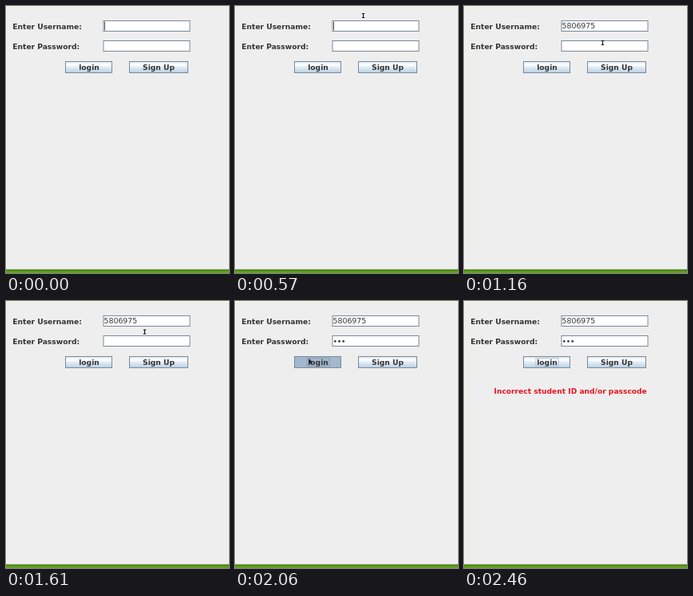
An HTML page for the animation above (2530 ms loop, 279 by 334 pixels).

```html
<!DOCTYPE html>
<html lang="en">
<head>
<meta charset="utf-8">
<title>Login form</title>
<style>
  html, body { margin: 0; width: 100%; height: 100%; overflow: hidden; background: #eee; }
  svg { display: block; width: 279px; height: 334px; }
  text { font: bold 9.15px "DejaVu Sans", sans-serif; fill: #333; white-space: pre; }
  .typed { font-weight: normal; font-size: 9.4px; }
  .middle { text-anchor: middle; }
  .field { fill: #fff; stroke: #7a8a99; }
  .button { fill: url(#metal); stroke: #7a8a99; }
  .button.pressed { fill: #a3b8cc; }
  .focus { fill: none; stroke: #a3b8cc; stroke-width: .8; }
  .pressed ~ .focus { stroke: #7f98b2; }
  #error { fill: #e8141e; }
</style>
</head>
<body>
<svg viewBox="0 0 279 334">
  <defs>
    <linearGradient id="metal" x2="0" y2="1">
      <stop offset="0" stop-color="#dde8f3"/>
      <stop offset=".3" stop-color="#fff"/>
      <stop offset=".5" stop-color="#e4edf6"/>
      <stop offset="1" stop-color="#b8cfe5"/>
    </linearGradient>
    <linearGradient id="grass" x2="0" y2="1">
      <stop offset="0" stop-color="#3f6a10"/>
      <stop offset=".5" stop-color="#5b9a16"/>
      <stop offset="1" stop-color="#6aa822"/>
    </linearGradient>
  </defs>

  <rect width="279" height="334" fill="#eee"/>
  <rect width="279" height="1" fill="#f8fbd4"/>
  <rect width="1" height="329" fill="#f3f7e6"/>
  <rect y="329.5" width="279" height="4.5" fill="url(#grass)"/>

  <text x="8.3" y="28.5">Enter Username:</text>
  <text x="8.3" y="54">Enter Password:</text>
  <rect class="field" x="122" y="18.5" width="108" height="13"/>
  <rect class="field" x="122" y="43.5" width="108" height="13"/>
  <text id="user" class="typed" x="122.5" y="28.2"></text>
  <g id="dots" fill="#333"></g>
  <path id="caret" d="M123.5 19.5v11" stroke="#555"/>

  <g>
    <rect id="login" class="button" x="74.5" y="69.5" width="58" height="14"/>
    <rect id="focus" class="focus" x="90" y="71.5" width="28" height="10"/>
    <text class="middle" x="104" y="79.6">login</text>
  </g>
  <rect class="button" x="154.5" y="69.5" width="73" height="14"/>
  <text class="middle" x="191" y="79.6">Sign Up</text>
  <text id="error" x="37.5" y="116.2">Incorrect student ID and/or passcode</text>

  <g id="pointer">
    <path id="beam" d="M-1.7-2.5h3.4M0-2.5v5M-1.7 2.5h3.4" fill="none" stroke="#111" stroke-width="1.1"/>
    <path id="arrow" d="M-1.5-3.5v6.5l1.5-1.3 1.1 2.3 1-.5-1-2.2h2z" fill="#222"/>
  </g>
</svg>
<script>
const LOOP = 2530;
const USERNAME = "5806975";
const el = id => document.getElementById(id);
const show = (id, on) => el(id).setAttribute("visibility", on ? "visible" : "hidden");
const typedCount = (t, start, step, max) =>
  Math.max(0, Math.min(max, Math.floor((t - start) / step) + 1));

// Pointer stops: time, x, y
const route = [
  [70, 166, -4], [380, 163, 14], [570, 160.5, 12], [1000, 160.5, 12],
  [1160, 173.5, 46], [1400, 173.5, 46], [1600, 173.5, 38.5],
  [1800, 173.5, 38.5], [1950, 94, 75.5]
];

function pointerAt(t) {
  const next = route.findIndex(stop => stop[0] > t);
  if (next === 0) return route[0].slice(1);
  if (next < 0) return route[route.length - 1].slice(1);
  const [t0, x0, y0] = route[next - 1];
  const [t1, x1, y1] = route[next];
  const u = (t - t0) / (t1 - t0);
  return [x0 + (x1 - x0) * u, y0 + (y1 - y0) * u];
}

for (let i = 0; i < 3; i++) {
  el("dots").insertAdjacentHTML("beforeend", `<circle cx="${125.3 + i * 5.2}" cy="50.4" r="1.3"/>`);
}

function draw(now) {
  const t = now % LOOP;
  const dots = typedCount(t, 1730, 45, 3);
  const overButton = t >= 1900;

  el("user").textContent = USERNAME.slice(0, typedCount(t, 640, 60, USERNAME.length));
  [...el("dots").children].forEach((dot, i) =>
    dot.setAttribute("visibility", i < dots ? "visible" : "hidden"));
  show("caret", t < 640);

  el("login").classList.toggle("pressed", t >= 2000 && t < 2110);
  show("focus", t >= 2000);
  show("error", t >= 2110);

  el("pointer").setAttribute("transform", `translate(${pointerAt(t)})`);
  el("pointer").setAttribute("opacity", t < 570 ? .5 : 1);
  show("beam", t >= 70 && !overButton);
  show("arrow", overButton && t < 2330);
  requestAnimationFrame(() => draw(performance.now()));
}
draw(0);
</script>
</body>
</html>
```
